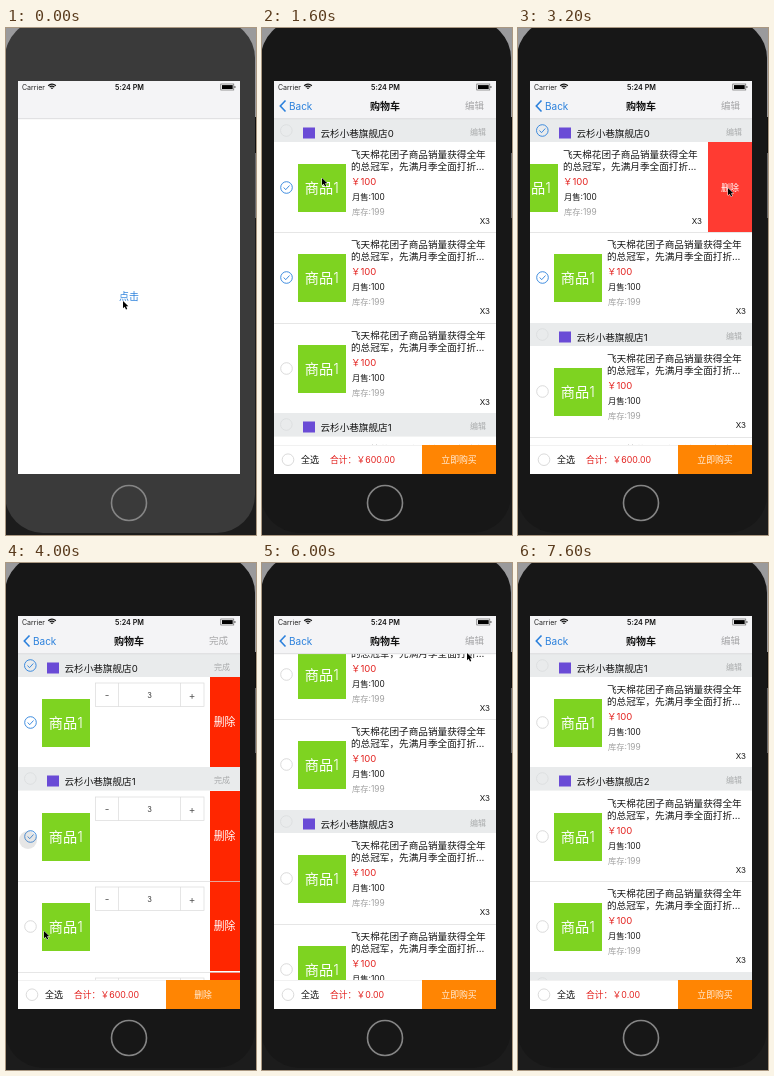
An HTML page with a canvas that plays this animation: 250x507 px, repeating every 8 s.

```html
<!DOCTYPE html>
<html lang="zh-CN">
<head>
<meta charset="utf-8">
<title>购物车</title>
<style>
html, body { margin: 0; width: 100%; height: 100%; overflow: hidden; background: #777; }
canvas { display: block; width: 250px; height: 507px; }
</style>
</head>
<body>
<canvas id="stage"></canvas>
<script>
const W = 250, H = 507, STEP = 400;
const SCREEN = { x: 12, y: 53, w: 222, h: 393 };
const LIST_TOP = 91, BAR_TOP = 417, HEAD_H = 23.6, ROW_H = 90.3;
const FONT = 'Inter, "Noto Sans CJK SC", "Noto Sans CJK JP", sans-serif';
const BLUE = '#2b80dc', RED = '#ff2600', ORANGE = '#ff8503', PRICE = '#e3221f';

const canvas = document.getElementById('stage');
const ctx = canvas.getContext('2d');
const ratio = window.devicePixelRatio || 1;
canvas.width = W * ratio;
canvas.height = H * ratio;

// Shops are separated by "/"; each digit is one row, 1 when ticked.
const START = '000/000/00/000', SHOP_TICKED = '111/000/00/000';
const TWO_TICKED = '1/100/00/000', ONE_LEFT = '/0/00/000';
const scenes = [
  { blank: true, cursor: [117, 273] },
  { shops: START, cursor: [127, 271] },
  { shops: '100/000/00/000', cursor: [25, 161] },
  { shops: '110/000/00/000', cursor: [25, 251] },
  { shops: '110/000/00/000', cursor: [60, 150] },
  { shops: SHOP_TICKED, cursor: [27, 104] },
  { shops: SHOP_TICKED, cursor: [211, 157], cursorScale: 2.9, swipe: 44 },
  { shops: '11/000/00/000', cursor: [205, 160] },
  { shops: '11/000/00/000', cursor: [210, 160], swipe: 44 },
  { shops: '1/000/00/000', edit: true, cursor: [212, 80] },
  { shops: TWO_TICKED, edit: true, cursor: [38, 368], touch: [22, 277] },
  { shops: TWO_TICKED, edit: true, cursor: [36, 366] },
  { shops: TWO_TICKED, edit: true, cursor: [30, 364] },
  { shops: '1/110/00/000', edit: true, cursor: [27, 365] },
  { shops: ONE_LEFT, edit: true, scroll: 162, cursor: [210, 76] },
  { shops: ONE_LEFT, scroll: 162, cursor: [205, 90] },
  { shops: ONE_LEFT, editShop: 1, cursor: [215, 104] },
  { shops: ONE_LEFT, editShop: 1, cursor: [84, 169] },
  { shops: ONE_LEFT, cursor: [215, 104] },
  { shops: ONE_LEFT }
];

function rect(x, y, w, h, color) {
  ctx.fillStyle = color;
  ctx.fillRect(x, y, w, h);
}

// y is the visual middle of the line.
function text(str, x, y, size, color = '#161616', align = 'left', weight = 400) {
  ctx.font = `${weight} ${size}px ${FONT}`;
  ctx.textAlign = align;
  ctx.fillStyle = color;
  ctx.fillText(str, x, y + size * 0.36);
}

function polyline(points, color, width) {
  ctx.beginPath();
  points.forEach(([x, y]) => ctx.lineTo(x, y));
  ctx.strokeStyle = color;
  ctx.lineWidth = width;
  ctx.stroke();
}

function ring(x, y, r, color, width, from = 0, to = Math.PI * 2) {
  ctx.beginPath();
  ctx.arc(x, y, r, from, to);
  ctx.strokeStyle = color;
  ctx.lineWidth = width;
  ctx.stroke();
}

function tick(x, y, on, idle = '#d6d6d6') {
  ring(x, y, 5.8, on ? BLUE : idle, 0.9);
  if (on) polyline([[x - 2.8, y], [x - 0.8, y + 2.2], [x + 3, y - 2]], BLUE, 0.9);
}

function drawPhone(dark) {
  rect(0, 0, W, 89, '#9a9a9c');
  rect(0, 89, W, 101, '#6a6a6c');
  rect(0, 190, W, H - 190, '#1c1c1c');
  rect(248, 89, 2, 36, '#111');
  ctx.beginPath();
  ctx.roundRect(-1, -8, 250, 513, 38);
  ctx.fillStyle = dark ? '#171717' : '#3a3a3a';
  ctx.fill();
  ring(123, 475, 17.5, '#858585', 1.6);
}

function drawStatus() {
  text('Carrier', 16, 59, 7, '#222');
  text('5:24 PM', 123.5, 59, 7.2, '#111', 'center', 600);
  [1.2, 3.2, 5.2].forEach(r => ring(46, 61.3, r, '#111', 1.2, -Math.PI * 0.76, -Math.PI * 0.24));
  ctx.strokeStyle = '#555';
  ctx.lineWidth = 0.6;
  ctx.strokeRect(214.8, 56, 13, 6);
  rect(216, 57.1, 10.7, 3.9, '#000');
  rect(228.4, 58, 1, 2, '#555');
}

function drawNav(scene) {
  rect(12, 53, 222, 38, '#f4f4f6');
  if (scene.edit && scene.scroll) {
    const glow = ctx.createRadialGradient(220, 84, 2, 220, 84, 28);
    glow.addColorStop(0, 'rgba(255,140,125,.5)');
    glow.addColorStop(1, 'rgba(255,160,150,0)');
    rect(190, 62, 44, 29, glow);
  }
  rect(12, 90.6, 222, 0.5, '#c4c4c6');
  drawStatus();
  if (scene.blank) return;
  polyline([[23.5, 72.5], [18.3, 78], [23.5, 83.5]], BLUE, 1.6);
  text('Back', 27, 78, 10, BLUE);
  text('购物车', 123, 78, 10, '#111', 'center', 600);
  text(scene.edit ? '完成' : '编辑', 222, 78, 9.5, '#a6a6a8', 'right');
}

function drawHeader(y, id, checked, editing) {
  rect(12, y, 222, HEAD_H, '#e9ebec');
  tick(24.3, y + 11.5, checked, '#dcdedf');
  rect(41, y + 8.5, 12, 11, '#6a4bd6');
  text('云杉小巷旗舰店' + id, 58.5, y + 14.2, 9.6);
  text(editing ? '完成' : '编辑', 224, y + 13, 8, '#a9abac', 'right');
}

function drawStepper(y) {
  ctx.strokeStyle = '#dadada';
  ctx.lineWidth = 0.7;
  ctx.strokeRect(89.5, y + 6, 108.5, 23.5);
  [112.5, 174.5].forEach(x => polyline([[x, y + 6], [x, y + 29.5]], '#dadada', 0.7));
  text('-', 101, y + 18, 10, '#555', 'center');
  text('3', 143.5, y + 17.8, 7.5, '#333', 'center');
  text('+', 186, y + 18, 10, '#555', 'center');
}

function drawDetails(y) {
  text('飞天棉花团子商品销量获得全年', 89, y + 12.7, 9.65);
  text('的总冠军，先满月季全面打折…', 89, y + 25, 9.65);
  text('￥100', 89, y + 40, 9.5, PRICE);
  text('月售:100', 90, y + 55, 8.3);
  text('库存:199', 90, y + 70, 8.3, '#a2a2a2');
  text('X3', 228, y + 79, 8, '#161616', 'right');
}

function drawRow(y, checked, editing, swipe, first) {
  rect(12, y, 222, ROW_H, '#fff');
  ctx.save();
  ctx.translate(-swipe, 0);
  tick(24.5, y + 45.5, checked);
  rect(36, y + 22, 48, 48, '#7ed321');
  text('商品1', 59.8, y + 45.8, 14.2, '#fff', 'center', 300);
  if (editing) drawStepper(y);
  else drawDetails(y);
  ctx.restore();
  if (editing) {
    rect(204, y, 30, 90, RED);
    text('删除', 218.5, y + 45.5, 10.8, '#fff', 'center');
  }
  if (swipe) {
    rect(234 - swipe, y, swipe, 90, '#ff3b32');
    text('删除', 212, y + 45.5, 9, '#fff', 'center');
  }
  if (!first) rect(12, y, 222, 0.7, '#dcdcdc');
}

function drawList(scene) {
  let y = LIST_TOP - (scene.scroll || 0);
  scene.shops.split('/').forEach((rows, id) => {
    if (!rows) return;
    const editing = scene.edit || scene.editShop === id;
    drawHeader(Math.floor(y), id, !rows.includes('0'), editing);
    y += HEAD_H;
    [...rows].forEach((mark, i) => {
      const swipe = id === 0 && i === 0 ? scene.swipe || 0 : 0;
      drawRow(Math.floor(y), mark === '1', editing, swipe, i === 0);
      y += ROW_H;
    });
  });
}

function drawBar(scene) {
  const total = 300 * (scene.shops.split('1').length - 1);
  rect(12, BAR_TOP, 222, 29, '#fff');
  rect(12, BAR_TOP, 148, 0.5, '#e2e2e2');
  tick(26, 431.7, false);
  text('全选', 39, 431.7, 9);
  text(`合计：￥${total.toFixed(2)}`, 68, 431.7, 8.8, PRICE);
  rect(160, BAR_TOP, 74, 29, ORANGE);
  text(scene.edit ? '删除' : '立即购买', 197, 431.7, 8.9, '#ffeedd', 'center');
}

function drawCursor([x, y], scale = 0.85) {
  ctx.save();
  ctx.translate(x, y);
  ctx.scale(scale, scale);
  ctx.beginPath();
  [[0, 0], [0, 8.6], [2, 6.8], [3.5, 10], [5, 9.3], [3.6, 6.2], [6.3, 6.2]].forEach(p => ctx.lineTo(...p));
  ctx.closePath();
  ctx.lineJoin = 'round';
  ctx.lineWidth = 1.1;
  ctx.strokeStyle = '#fff';
  ctx.stroke();
  ctx.fillStyle = '#000';
  ctx.fill();
  ctx.restore();
}

function drawTouch([x, y]) {
  ctx.beginPath();
  ctx.arc(x, y, 9, 0, Math.PI * 2);
  ctx.fillStyle = 'rgba(130,130,130,.2)';
  ctx.fill();
}

function draw(scene) {
  ctx.setTransform(ratio, 0, 0, ratio, 0, 0);
  drawPhone(!scene.blank);
  ctx.save();
  ctx.beginPath();
  ctx.rect(SCREEN.x, SCREEN.y, SCREEN.w, SCREEN.h);
  ctx.clip();
  rect(SCREEN.x, SCREEN.y, SCREEN.w, SCREEN.h, '#fff');
  if (scene.blank) {
    text('点击', 123, 268, 10, BLUE, 'center');
  } else {
    drawList(scene);
    drawBar(scene);
  }
  drawNav(scene);
  if (scene.touch) drawTouch(scene.touch);
  ctx.restore();
  if (scene.cursor) drawCursor(scene.cursor, scene.cursorScale);
}

const begin = performance.now();
function loop() {
  const elapsed = performance.now() - begin;
  draw(scenes[Math.floor(elapsed / STEP) % scenes.length]);
  requestAnimationFrame(loop);
}
loop();
</script>
</body>
</html>
```
